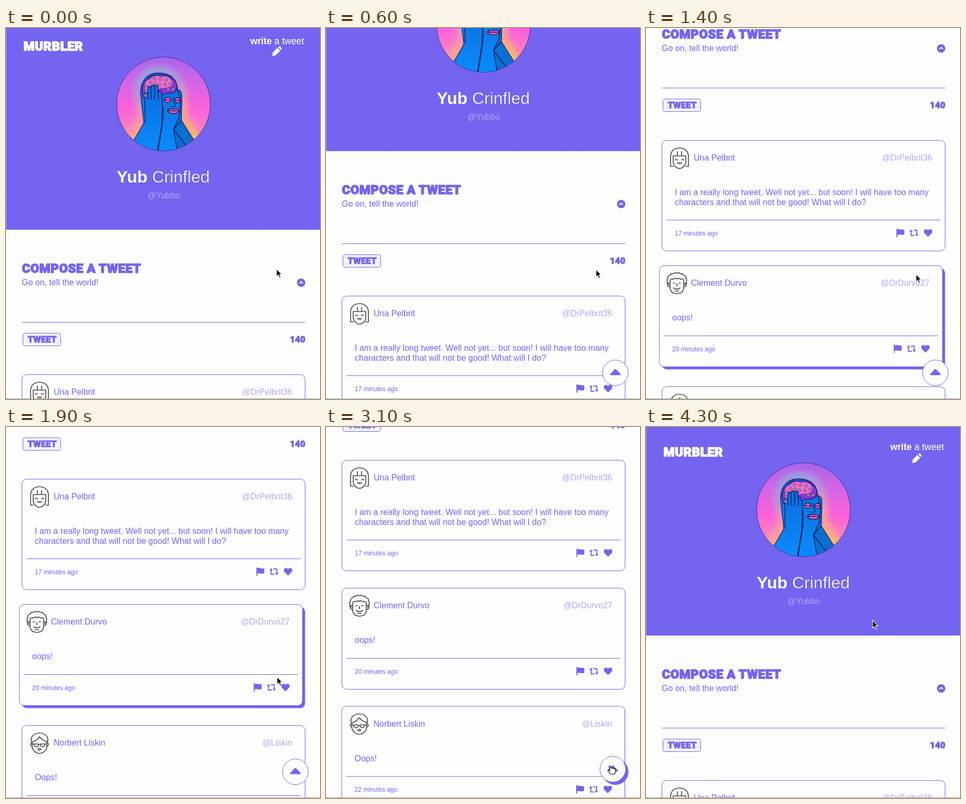
Animation of 600x708 px, one loop 4400 ms. Source, as an HTML page:

```html
<!DOCTYPE html>
<html lang="en">
<head>
<meta charset="utf-8">
<title>Feed scroll</title>
<style>
  html, body { margin: 0; width: 100%; height: 100%; overflow: hidden; background: #fdfdfd; }
  svg { display: block; --violet: #7464f0; }
  text { font: 16px "Liberation Sans", Arial, sans-serif; fill: var(--violet); white-space: pre; }
  .block { font: 900 24px Roboto, Inter, sans-serif; letter-spacing: .5px; stroke: var(--violet); stroke-width: 1.5; }
  .small { font-size: 16.5px; letter-spacing: .3px; stroke-width: 1.1; }
  .white { fill: #fff; stroke: #fff; }
  .time { font-size: 12px; }
  .faint { fill: #b2a6f5; }
  .name { font-size: 32px; fill: #fff; }
  .light { stroke: var(--violet); stroke-width: .5; }
  .nav { font-size: 17.6px; fill: #fff; }
  .bold { font-weight: 700; }
  .end { text-anchor: end; }
  .mid { text-anchor: middle; }
  .line { fill: none; stroke: var(--violet); }
  .card { fill: #fdfdfd; stroke: var(--violet); }
  .face { fill: none; stroke: #4b4a49; stroke-width: 1.7; stroke-linecap: round; stroke-linejoin: round; }
  .ink { stroke: #101c58; stroke-width: 1.3; stroke-linejoin: round; }
  .accent { fill: var(--violet); }
</style>
</head>
<body>
<svg id="stage" width="600" height="708" viewBox="0 0 600 708">
  <defs>
    <linearGradient id="sky" x1="0" y1="0" x2="0" y2="1">
      <stop offset="0" stop-color="#a964ec"/>
      <stop offset=".3" stop-color="#d865e4"/>
      <stop offset=".55" stop-color="#fb60da"/>
      <stop offset=".78" stop-color="#fc84bc"/>
      <stop offset="1" stop-color="#ffb066"/>
    </linearGradient>
    <linearGradient id="glow" x1="0" y1="0" x2=".35" y2="1">
      <stop offset="0" stop-color="#83a8e0"/>
      <stop offset=".35" stop-color="#b690dc"/>
      <stop offset=".65" stop-color="#fc98a8"/>
      <stop offset="1" stop-color="#ffb668"/>
    </linearGradient>
    <linearGradient id="skin" x1="0" y1="0" x2="0" y2="1">
      <stop offset="0" stop-color="#0c6cdc"/>
      <stop offset="1" stop-color="#0b8cfc"/>
    </linearGradient>
    <filter id="soft" x="-30%" y="-30%" width="160%" height="160%"><feGaussianBlur stdDeviation="5"/></filter>
    <clipPath id="round"><circle cx="301" cy="158" r="89.5"/></clipPath>
  </defs>

  <g id="page">
    <rect class="accent" width="600" height="398"/>
    <g id="specks" fill="#9a8cf8" opacity=".4"></g>
    <rect width="1" height="398" fill="#a79df5"/>
    <text class="block white" x="33.5" y="55.500">MURBLER</text>
    <text class="nav end" x="569.5" y="44"><tspan class="bold">write</tspan> a tweet</text>
    <path id="pencil" fill="#fff" d="M-9 9l1.300-6.500L.8-6.700l5.700 5.700L-2.500 7.800zM2.200-7.800L4-9.200q1.200-.8 2.400.2L8.600-6.700q1 1.200 0 2.400L7.500-2.500z"/>

    <g clip-path="url(#round)">
      <rect x="211" y="68" width="180" height="180" fill="url(#sky)"/>
      <path filter="url(#soft)" fill="url(#glow)" d="M252 180C234 135 246 86 291 85C338 85 350 122 348 180L385 250H215z"/>
      <g class="ink" fill="url(#skin)">
        <path d="M328 131q7-1 8 12l-1 46 28 44-15 20h-56l14-60z" fill="#0b6fd0"/>
        <path d="M258 146C254 118 267 99 291 99C317 99 328 113 328 133L334 154 331 182 320 206 328 252H270z"/>
        <path d="M263 146C256 127 264 113 271 111C277 101 289 102 293 104C302 100 313 104 316 110C326 113 329 124 325 132C319 140 309 136 303 139L290 146z" fill="#8a34d8"/>
        <path d="M267 132C261 118 271 110 276 111C282 102 293 104 297 107C306 103 316 109 318 117C320 126 304 128 297 127Q284 136 267 132z" fill="#f46bd0" stroke="none"/>
        <path d="M265 156l1-20q2-5 5 0v-9q3-6 6 0v-3q4-5 7 0v1q4-6 7 1v8q4-3 6 3l2 20q3 19 0 38l-9 57H230l36-62z"/>
        <path fill="none" d="M271 136v14M277 127v23M284 125v25M291 134v17M299 157l-1 38-9 53M320 145q-1 9 4 16-4 3-8 1M335 189l-15 17M320 206l26 34"/>
        <path fill="#f45ac4" d="M302 150q2-5 7-5t7 5q-2 5-7 5t-7-5zM322 151q2-5 6-5t5 5q-1 5-5 5t-6-5zM308 171q6-6 12-3 7-3 12 3-5 6-12 5-7 1-12-5z"/>
        <path fill="none" d="M302 150h14M322 151h11M308 171h24"/>
      </g>
      <g id="brainEyes"></g>
    </g>
    <circle cx="301" cy="158" r="89.500" fill="none" stroke="#3d3192"/>

    <text class="name mid" x="300.5" y="308"><tspan class="bold">Yub</tspan><tspan class="light"> Crinfled</tspan></text>
    <text class="faint mid" x="301" y="338">@Yubbo</text>

    <text class="block" x="30.500" y="479.500">COMPOSE A TWEET</text>
    <text x="30" y="504">Go on, tell the world!</text>
    <circle class="accent" cx="564" cy="499" r="8"/>
    <path d="M560.500 500.500l3.500-3.500 3.500 3.500" fill="none" stroke="#fff" stroke-width="1.8"/>
    <path class="line" d="M30 574.500H572"/>
    <rect x="32.500" y="595.500" width="72" height="24" rx="4" fill="#f3f2fd" stroke="#7464f0"/>
    <text class="block small" x="41.500" y="613">TWEET</text>
    <text class="block small end" x="572" y="613">140</text>
    <g id="cards"></g>
  </g>

  <g id="toTop">
    <circle id="topShadow" class="accent" cx="553" cy="658" r="25"/>
    <g id="topFace">
      <circle class="card" cx="553" cy="658" r="24.500"/>
      <path class="accent" d="M544 662.500q-2-.5-.5-2.500l8-8.500q1.500-1.500 3 0l8 8.500q1.500 2-.5 2.500z"/>
    </g>
  </g>
  <path d="M0 707.500H600" stroke="#a5a5ab"/>
  <g id="cursor">
    <path id="arrow" d="M0 0V14.500L3.300 11.400 5.600 16.800 8 15.800 5.700 10.400H10.200z" fill="#000" stroke="#fff" stroke-width="1.100"/>
    <path id="hand" d="M-3 8L-7 2q-1-3 1.500-2L-3.500 2-5-5q0-2.500 2-2l2 5V-3q2-1.500 3 .5 2-1 3 1 2.500-.5 2.500 2L7 5 5 8.500z" fill="#fff" stroke="#000" stroke-width="1.200"/>
  </g>
</svg>

<script>
const LOOP = 4400;
const STEP = 100;
const byId = id => document.getElementById(id);
const clamp = v => Math.min(1, Math.max(0, v));
const smooth = v => v * v * (3 - 2 * v);
const move = (id, x, y) => byId(id).setAttribute("transform", `translate(${x} ${y})`);
const show = (id, on) => byId(id).setAttribute("visibility", on ? "visible" : "hidden");

// keys: [time, ...values]
function track(t, keys, ease = v => v) {
  let i = 1;
  while (i < keys.length - 1 && t > keys[i][0]) i++;
  const [a, b] = [keys[i - 1], keys[i]];
  const p = ease(clamp((t - a[0]) / (b[0] - a[0])));
  return a.slice(1).map((v, n) => v + (b[n + 1] - v) * p);
}

// Rises to 1 after `start` and falls back after `end`, each within 100 ms.
const hover = (t, start, end) => clamp((t - start) / 100) - clamp((t - end) / 100);

const faces = {
  fringe: `M-12 16H-17V-3C-17-14-9-19 0-19S17-14 17-3V16H12M-12-4V7C-12 14-6 20 0 20S12 14 12 7V-4z
    M-4-4V-12M4-4V-12M-8 4q2-3 4 0M4 4q2-3 4 0M-4 9q2 3.500 4 0 2 3.500 4 0`,
  curls: `M-15 3q-5-2-3-6-2-4 1-6-1-5 4-6 1-4 6-3 3-3 7-1 4-2 7 1 5-1 6 3 5 1 4 6 3 2 1 6 2 4-3 6
    M-13-6q3-4 6-1 3-4 7-1 4-3 7 1 3-3 6 1V10q-2 9-8 9-5 2-10 0-6 0-8-9z
    M-13 0q-5-1-5 3t5 4M13 0q5-1 5 3t-5 4M-7 0h3M4 0h3M0 1v5M-6 9q6 5 12 0M-4 15h8`,
  glasses: `M-14 0C-20-10-11-19 0-19S20-10 14 0M-14 0q-4 0-3 4l3 3M14 0q4 0 3 4l-3 3
    M-14-2Q-5-4 0-12 6-4 14-3V7C14 14 6 20 0 20S-14 14-14 7z
    M-10 2h8v3q-4 5-8 0zM2 2h8v3q-4 5-8 0zM-2 3h4M-14 2h4M10 2h4M-3 12q3-3 6 0-3 4-6 0z`
};

const cards = [
  { top: 674, height: 211, face: "fringe", name: "Una Pelbrit", handle: "@DrPelbrit36", age: 17, hover: [720, 1200],
    lines: ["I am a really long tweet. Well not yet... but soon! I will have too many",
            "characters and that will not be good! What will I do?"] },
  { top: 918, height: 193, face: "curls", name: "Clement Durvo", handle: "@DrDurvo27", age: 20, hover: [1285, 2450],
    lines: ["oops!"] },
  { top: 1144, height: 193, face: "glasses", name: "Norbert Liskin", handle: "@Liskin", age: 22, hover: [2600, 3010],
    lines: ["Oops!"] }
];

const icons = `
  <path class="accent" transform="translate(456)" d="M-7.500-8v16h2v-4.500c4-2 7 2 13-.5v-9.500c-5 2-8-2-13 0V-8z"/>
  <g transform="translate(482)">
    <path class="line" stroke-width="2" d="M-5.500-4V5H1M5.500 4V-5H-1"/>
    <path class="accent" d="M-9-2.500L-5.500-6.500-2-2.500zM9 2.500L5.500 6.500 2 2.500z"/>
  </g>
  <path class="accent" transform="translate(509)" d="M0 7.500L-7 .5C-10-4-6-8.500-2-6.500L0-5 2-6.500C6-8.500 10-4 7 .5z"/>`;

function cardMarkup(card, i) {
  const h = card.height;
  const box = `x=".5" y=".5" width="541" height="${h}" rx="9"`;
  return `<g transform="translate(30 ${card.top})">
    <rect id="shadow${i}" class="accent" ${box}/>
    <g id="card${i}">
      <rect class="card" ${box}/>
      <path class="face" transform="translate(34 34)" d="${faces[card.face]}"/>
      <text x="61" y="39">${card.name}</text>
      <text class="faint end" x="517" y="39">${card.handle}</text>
      ${card.lines.map((s, n) => `<text x="25" y="${105 + 19 * n}">${s}</text>`).join("")}
      <path class="line" d="M9 ${h - 58.5}H533"/>
      <text class="time" x="25" y="${h - 29.5}">${card.age} minutes ago</text>
      <g transform="translate(0 ${h - 34})">${icons}</g>
    </g></g>`;
}
byId("cards").innerHTML = cards.map(cardMarkup).join("");

let seed = 7;
const random = () => (seed = seed * 16807 % 2147483647) / 2147483647;
byId("specks").innerHTML = Array.from({ length: 240 }, () =>
  `<rect x="${(random() * 600).toFixed(1)}" y="${(random() * 398).toFixed(1)}" width="1.2" height="1.2"/>`).join("");

byId("brainEyes").innerHTML = [[268, 124], [276, 117], [284, 110], [295, 111], [306, 112], [314, 119], [304, 121],
  [293, 121], [285, 119], [319, 130], [310, 130], [268, 133], [267, 142]].map(([x, y]) =>
  `<circle cx="${x}" cy="${y}" r="2.6" fill="#fbe9c8" stroke="#2c1459" stroke-width=".9"/>
   <circle cx="${x}" cy="${y}" r="1" fill="#1c1040"/>`).join("");

const scrollDown = [[0, 13], [600, 163], [1000, 335], [1200, 415], [1400, 460], [1900, 575], [2350, 611]];
const scrollUp = [[3120, 611], [3450, 0]];
const pointer = [[0, 517, 460], [600, 516, 461], [1400, 516, 470], [1900, 518, 477], [2350, 521, 488],
  [3000, 546, 645], [3600, 546, 645], [4150, 433, 369]];

function draw(t) {
  const [scroll] = t < 3120 ? track(t, scrollDown) : track(t, scrollUp, smooth);
  move("page", 0, -scroll);
  move("pencil", 517.5, 59.3 - 1.8 * Math.cos(t * 2 * Math.PI / 1000));

  cards.forEach((card, i) => {
    const lift = 5 * hover(t, ...card.hover);
    move("card" + i, -lift, -lift);
    show("shadow" + i, lift > 0);
  });

  const topLift = 5 * hover(t, 2990, 3500);
  const topVisible = scroll > 20;
  show("toTop", topVisible);
  move("topFace", -topLift, -topLift);
  byId("topShadow").setAttribute("opacity", topLift > 0 ? 1 : 0);

  const overTop = topVisible && topLift > 0;
  const [x, y] = track(t, pointer, smooth);
  move("cursor", x, y + (overTop ? 9 : 0));
  show("hand", overTop);
  show("arrow", !overTop);
}

function tick() {
  draw(Math.floor(performance.now() % LOOP / STEP) * STEP);
  requestAnimationFrame(tick);
}
tick();
</script>
</body>
</html>
```
